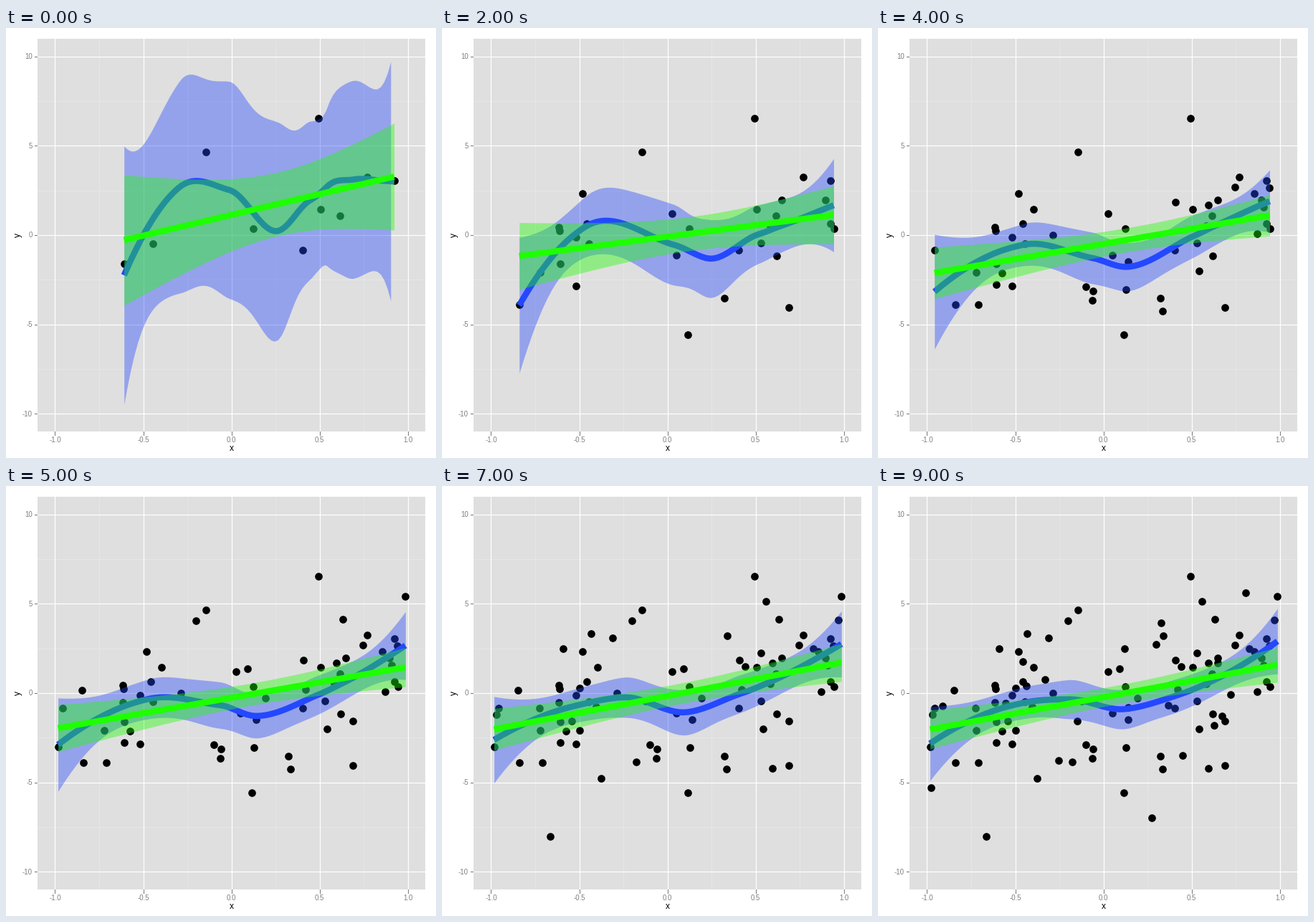
These frames come from a looping animation (600 px wide and 600 px high, 10 s). A matplotlib script:

```python
import numpy as np
import matplotlib.pyplot as plt
from matplotlib.animation import FuncAnimation

SIZE, DPI = 600, 100
PT = 72 / DPI                      # points per pixel
PANEL = (43.8, 14.65, 585.4, 563.35)
GREY, BLUE, GREEN = "#7f7f7f", "#2448ff", "#1eff00"
SPAN, CELL, GRID = 0.75, 0.2, 80

# (x, y) samples in order of arrival, ten per step
first = [(-.609, -1.62), (-.445, -.47), (-.144, 4.64), (.123, .38), (.405, -.85),
         (.492, 6.55), (.506, 1.46), (.613, 1.07), (.769, 3.25), (.922, 3.03)]
second = [(-.721, -2.1), (-.483, 2.32), (-.52, -2.84), (.026, 1.19), (.117, -5.56),
          (.582, .54), (.646, 1.95), (.621, -1.16), (.688, -4.03), (.923, .63)]
third = [(-.84, -3.89), (-.616, .46), (-.611, .23), (-.519, -.13), (-.458, .64),
         (.052, -1.13), (.322, -3.54), (.531, -.44), (.896, 1.95), (.942, .35)]
fourth = [(-.608, -2.78), (-.576, -2.13), (-.101, -2.87), (-.061, -3.13), (-.065, -3.64),
          (.129, -3.05), (.333, -4.27), (.853, 2.34), (.869, .07), (.907, 1.58)]
fifth = [(-.958, -.83), (-.708, -3.9), (-.397, 1.46), (-.287, 0), (.14, -1.48),
         (.409, 1.85), (.595, 1.68), (.54, -1.99), (.743, 2.69), (.938, 2.65)]
sixth = [(-.983, -3.01), (-.849, .18), (-.616, -.54), (-.201, 4.03), (.092, 1.36),
         (.194, -.27), (.42, .2), (.633, 4.14), (.687, -1.55), (.986, 5.4)]
seventh = [(-.97, -1.2), (-.663, -8.02), (-.541, -1.58), (-.496, -2.1), (-.404, -.76),
           (-.312, 3.07), (.337, 3.21), (.531, 2.24), (.595, -4.2), (.968, 4.1)]
eighth = [(-.724, -.86), (-.59, 2.5), (-.5, .3), (-.435, 3.32), (-.377, -4.79),
          (-.179, -3.83), (-.125, -.43), (.44, 1.48), (.558, 5.15), (.828, 2.47)]
ninth = [(-.979, -5.3), (-.555, -.56), (-.437, .39), (-.253, -3.76), (.119, 2.47),
         (.275, -6.97), (.325, 3.93), (.45, -3.49), (.673, -1.3), (.806, 5.6)]
tenth = [(-.912, -.73), (-.457, 1.77), (-.333, .75), (-.149, -1.55), (.14, -.8),
         (.297, 2.71), (.369, -.7), (.627, -1.8), (.72, -.09), (.648, 1.67)]
BATCHES = [first, second, third, fourth, fifth, sixth, seventh, eighth, ninth, tenth]


def t_quantile(df):
    """97.5 % point of Student's t by series expansion."""
    z = 1.959964
    g1 = (z**3 + z) / 4
    g2 = (5 * z**5 + 16 * z**3 + 3 * z) / 96
    g3 = (3 * z**7 + 19 * z**5 + 17 * z**3 - 15 * z) / 384
    g4 = (79 * z**9 + 776 * z**7 + 1482 * z**5 - 1920 * z**3 - 945 * z) / 92160
    return z + g1 / df + g2 / df**2 + g3 / df**3 + g4 / df**4


def linear_fit(x, y, at):
    n, mx = len(x), x.mean()
    sxx = ((x - mx)**2).sum()
    slope = ((x - mx) * y).sum() / sxx
    mid = y.mean() + slope * (at - mx)
    res = y - y.mean() - slope * (x - mx)
    sigma = np.sqrt((res**2).sum() / (n - 2))
    half = t_quantile(n - 2) * sigma * np.sqrt(1 / n + (at - mx)**2 / sxx)
    return mid, half


def knots(x):
    """Vertices of the recursive median split, plus a padded border."""
    xs, limit, cuts = np.sort(x), int(len(x) * SPAN * CELL), []

    def split(lo, hi):
        if hi - lo <= limit:
            return
        m = lo + (hi - lo + 1) // 2
        cuts.append((xs[m - 1] + xs[m]) / 2)
        split(lo, m)
        split(m, hi)

    split(0, len(x))
    pad = 0.1 * np.ptp(x)
    return np.unique([xs[0] - pad, *cuts, xs[-1] + pad])


def local_rows(x, v):
    """Weights on y giving value and slope of the local parabola at v."""
    d = np.abs(x - v)
    reach = np.sort(d)[int(len(x) * SPAN + 1e-5) - 1]
    w = np.sqrt(np.clip(1 - (d / reach)**3, 0, None)**3)
    basis = np.stack([np.ones_like(x), x - v, (x - v)**2], axis=1)
    return (np.linalg.pinv(basis * w[:, None]) * w)[:2]


def smoother(x, at):
    """Matrix mapping y to loess values, blended by cubics between knots."""
    v = knots(x)
    rows = np.array([local_rows(x, k) for k in v])
    i = np.clip(np.searchsorted(v, at) - 1, 0, len(v) - 2)
    gap = (v[i + 1] - v[i])[:, None]
    h = (at - v[i])[:, None] / gap
    return ((1 - h)**2 * (1 + 2 * h) * rows[i, 0] + h**2 * (3 - 2 * h) * rows[i + 1, 0]
            + gap * (h * (1 - h)**2 * rows[i, 1] - h**2 * (1 - h) * rows[i + 1, 1]))


def loess_fit(x, y, at):
    rest = np.eye(len(x)) - smoother(x, x)
    spread = rest @ rest.T
    d1, d2 = np.trace(spread), np.trace(spread @ spread)
    sigma = np.sqrt(((rest @ y)**2).sum() / d1)
    op = smoother(x, at)
    half = t_quantile(d1**2 / d2) * sigma * np.sqrt((op**2).sum(axis=1))
    return op @ y, half


fig = plt.figure(figsize=(SIZE / DPI, SIZE / DPI), dpi=DPI, facecolor="white")

# page axes in pixels, for ticks and labels
page = fig.add_axes([0, 0, 1, 1])
page.set(xlim=(0, SIZE), ylim=(SIZE, 0))
page.axis("off")

left, top, right, bottom = PANEL
ax = fig.add_axes([left / SIZE, 1 - bottom / SIZE,
                   (right - left) / SIZE, (bottom - top) / SIZE], facecolor="#dfdfdf")
ax.set(xlim=(-1.1, 1.1), ylim=(-11, 11), xticks=[], yticks=[])
ax.spines[:].set_visible(False)


def label(x, y, text, size, color, **kw):
    page.text(x, y, text, fontsize=size * PT, color=color, family="Liberation Sans", **kw)


def rule(line, places, color, width):
    for p in places:
        line(p, color=color, lw=width * PT, zorder=0.5)


rule(ax.axvline, (-.75, -.25, .25, .75), "#e8e8e8", 0.8)
rule(ax.axhline, (-7.5, -2.5, 2.5, 7.5), "#e8e8e8", 0.8)
rule(ax.axvline, (-1, -.5, 0, .5, 1), "white", 1.2)
rule(ax.axhline, (-10, -5, 0, 5, 10), "white", 1.2)

for k in range(-2, 3):
    px = (left + right) / 2 + k / 2 * (right - left) / 2.2
    py = (top + bottom) / 2 - k * 5 * (bottom - top) / 22
    page.plot([px, px], [bottom, bottom + 4.2], color=GREY, lw=1.1 * PT)
    page.plot([left - 4.2, left], [py, py], color=GREY, lw=1.1 * PT)
    label(px, 578, f"{k / 2:.1f}", 9.6, GREY, ha="center", va="baseline")
    label(36.8, py + 3.5, str(k * 5), 9.6, GREY, ha="right", va="baseline")
label(314.6, 590, "x", 12, "black", ha="center", va="baseline")
label(16.5, 289, "y", 12, "black", ha="center", va="center", rotation=90)

drawn = []


def band(at, fit, color, z):
    mid, half = fit
    low, high = mid - half, mid + half
    inside = (low >= -10) & (high <= 10)
    drawn.append(ax.fill_between(at, low, high, where=inside, color=color,
                                 alpha=0.4, lw=0, zorder=z))
    drawn.extend(ax.plot(at, mid, color=color, lw=8.5 * PT, zorder=z + 0.5,
                         solid_capstyle="butt", solid_joinstyle="round"))


def draw(step):
    while drawn:
        drawn.pop().remove()
    x, y = np.array(sum(BATCHES[:step + 1], [])).T
    at = np.linspace(x.min(), x.max(), GRID)
    drawn.append(ax.scatter(x, y, s=(10.7 * PT)**2, color="black", lw=0, zorder=1))
    band(at, loess_fit(x, y, at), BLUE, 2)
    band(at, linear_fit(x, y, at), GREEN, 3)
    return drawn


anim = FuncAnimation(fig, draw, frames=len(BATCHES), init_func=lambda: draw(0),
                     interval=1000, repeat=True, repeat_delay=0, blit=False)
plt.show()
```
